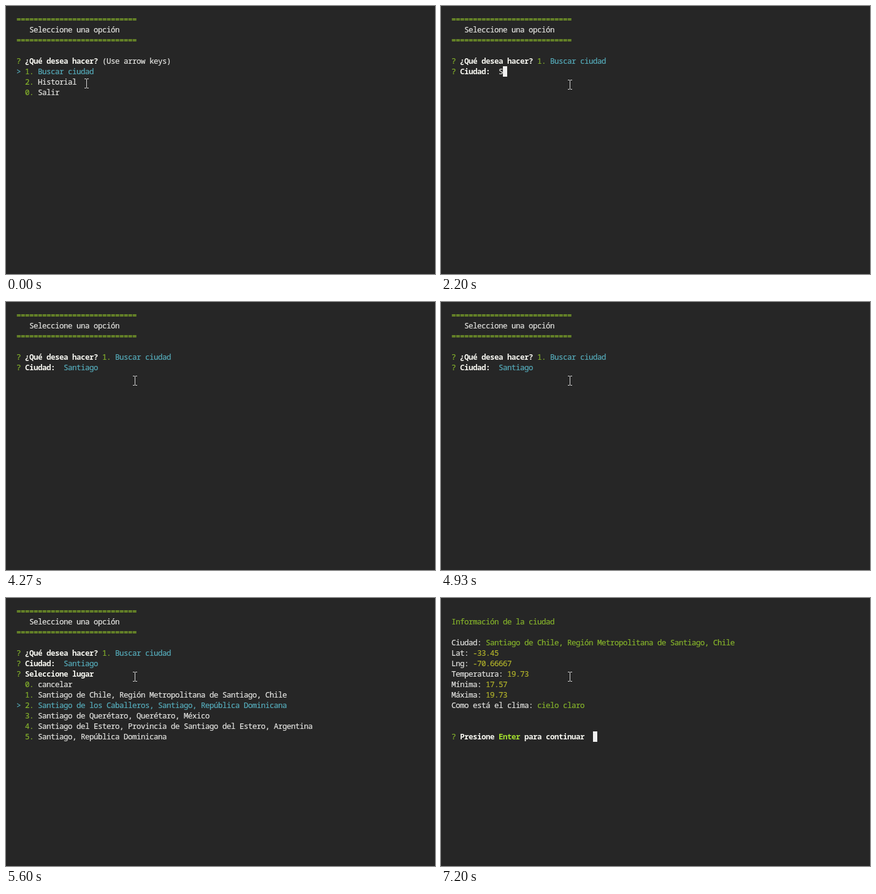
An HTML page that plays this animation: 700x436 px, repeating every 8000 ms.

```html
<!DOCTYPE html>
<html lang="es">
<head>
<meta charset="utf-8">
<title>Terminal: buscar ciudad</title>
<style>
  html, body { margin: 0; width: 100%; height: 100%; overflow: hidden; background: #262626; }
  #stage { position: relative; width: 700px; height: 436px; overflow: hidden; background: #262626; }
  #screen {
    position: absolute; left: 17px; top: 13px;
    font: 500 12.5px/17px "Noto Sans Mono", "DejaVu Sans Mono", monospace;
    letter-spacing: -.5px; -webkit-text-stroke: .2px;
    color: #e6e6e3; white-space: pre; font-variant-ligatures: none;
  }
  .row { height: 17px; }
  .green { color: #86b42b; }
  .cyan { color: #56adbc; }
  .yellow { color: #b3b42b; }
  .bold, .bright { font-weight: 700; -webkit-text-stroke: 0; }
  .bold { color: #f8f8f2; }
  .bright { color: #a6e22e; }
  #caret { position: absolute; width: 7px; height: 17px; background: #f0f0f0; }
  #mouse { position: absolute; left: 0; top: 0; }
</style>
</head>
<body>
<div id="stage">
  <div id="screen"></div>
  <div id="caret"></div>
  <svg id="mouse" width="7" height="16" shape-rendering="crispEdges">
    <path d="M0 0h3v1h1v-1h3v1h-3v14h3v1h-3v-1h-1v1h-3v-1h3v-14h-3z" fill="#d8d8d8"/>
  </svg>
</div>
<script>
const LOOP = 8000;
const $ = id => document.getElementById(id);
const paint = name => text => `<span class="${name}">${text}</span>`;
const [green, cyan, yellow, bold, bright] =
  ["green", "cyan", "yellow", "bold", "bright"].map(paint);

const CITY = "Santiago";
const PLACES = [
  "cancelar",
  "Santiago de Chile, Región Metropolitana de Santiago, Chile",
  "Santiago de los Caballeros, Santiago, República Dominicana",
  "Santiago de Querétaro, Querétaro, México",
  "Santiago del Estero, Provincia de Santiago del Estero, Argentina",
  "Santiago, República Dominicana"
];
const HINT = " (Use arrow keys)";

const ask = text => green("?") + " " + bold(text);
const option = (n, text, selected) =>
  (selected ? cyan("&gt;") : " ") + ` ${green(n + ".")} ` + (selected ? cyan(text) : text);

const rule = green("=".repeat(28));
const header = [rule, "   Seleccione una opción", rule, ""];
const action = ask("¿Qué desea hacer?");
const chosen = [...header, `${action} ${green("1.")} ${cyan("Buscar ciudad")}`];
const answered = [...chosen, `${ask("Ciudad:")}  ${cyan(CITY)}`];
const placeAsk = ask("Seleccione lugar");

// Each screen is its rows plus an optional caret cell [column, row].
const menu = {
  rows: [...header, action + HINT, option(1, "Buscar ciudad", true),
    option(2, "Historial"), option(0, "Salir")]
};
const typing = count => ({
  rows: [...chosen, `${ask("Ciudad:")}  ${CITY.slice(0, count)}`],
  caret: [11 + count, 5]
});
const retyping = { rows: chosen, caret: [0, 5] };
const searching = { rows: answered, caret: [0, 6] };
const cleared = { rows: answered };
const list = (selected, hint = "") => ({
  rows: [...answered, placeAsk + hint, ...PLACES.map((p, i) => option(i, p, i === selected))]
});
const loading = {
  rows: [...answered, `${placeAsk} ${green("1.")} ${cyan(PLACES[1])}`],
  caret: [0, 7]
};
const blank = { rows: [], caret: [0, 0] };
const report = {
  rows: ["", green("Información de la ciudad"), "",
    "Ciudad: " + green(PLACES[1]),
    "Lat: " + yellow("-33.45"),
    "Lng: " + yellow("-70.66667"),
    "Temperatura: " + yellow("19.73"),
    "Mínima: " + yellow("17.57"),
    "Máxima: " + yellow("19.73"),
    "Como está el clima: " + green("cielo claro"),
    "", "",
    ask("Presione ") + bright("Enter") + bold(" para continuar")],
  caret: [33, 12]
};

const screens = [
  [0, menu],
  [1070, typing(0)], [2200, typing(1)], [2400, typing(2)], [2530, typing(3)],
  [2670, typing(4)], [2800, typing(5)], [2870, retyping], [2930, typing(6)],
  [3070, typing(8)], [3130, searching],
  [3270, cleared], [3330, list(0, HINT)],
  [4270, cleared], [4330, list(1)],
  [4800, list(2)], [4930, cleared], [5000, list(3)], [5130, list(4)],
  [5400, cleared], [5470, list(3)], [5600, list(2)], [5670, cleared], [5730, list(1)],
  [6270, loading], [7130, blank], [7200, report]
];
const mousePath = [
  [0, [128, 118]], [70, [138, 118]], [130, [157, 120]],
  [200, [181, 121]], [270, [200, 122]], [330, [207, 120]]
];

const at = (steps, time) => steps.findLast(([start]) => start <= time)[1];

let shown;
function draw() {
  const time = performance.now() % LOOP;
  const screen = at(screens, time);
  if (screen !== shown) {
    shown = screen;
    $("screen").innerHTML = screen.rows.map(r => `<div class="row">${r}</div>`).join("");
    const caret = $("caret").style;
    caret.display = screen.caret ? "block" : "none";
    if (screen.caret) {
      caret.left = 17 + 7 * screen.caret[0] + "px";
      caret.top = 13 + 17 * screen.caret[1] + "px";
    }
  }
  const [x, y] = at(mousePath, time);
  $("mouse").style.transform = `translate(${x}px, ${y}px)`;
  requestAnimationFrame(draw);
}
draw();
</script>
</body>
</html>
```
